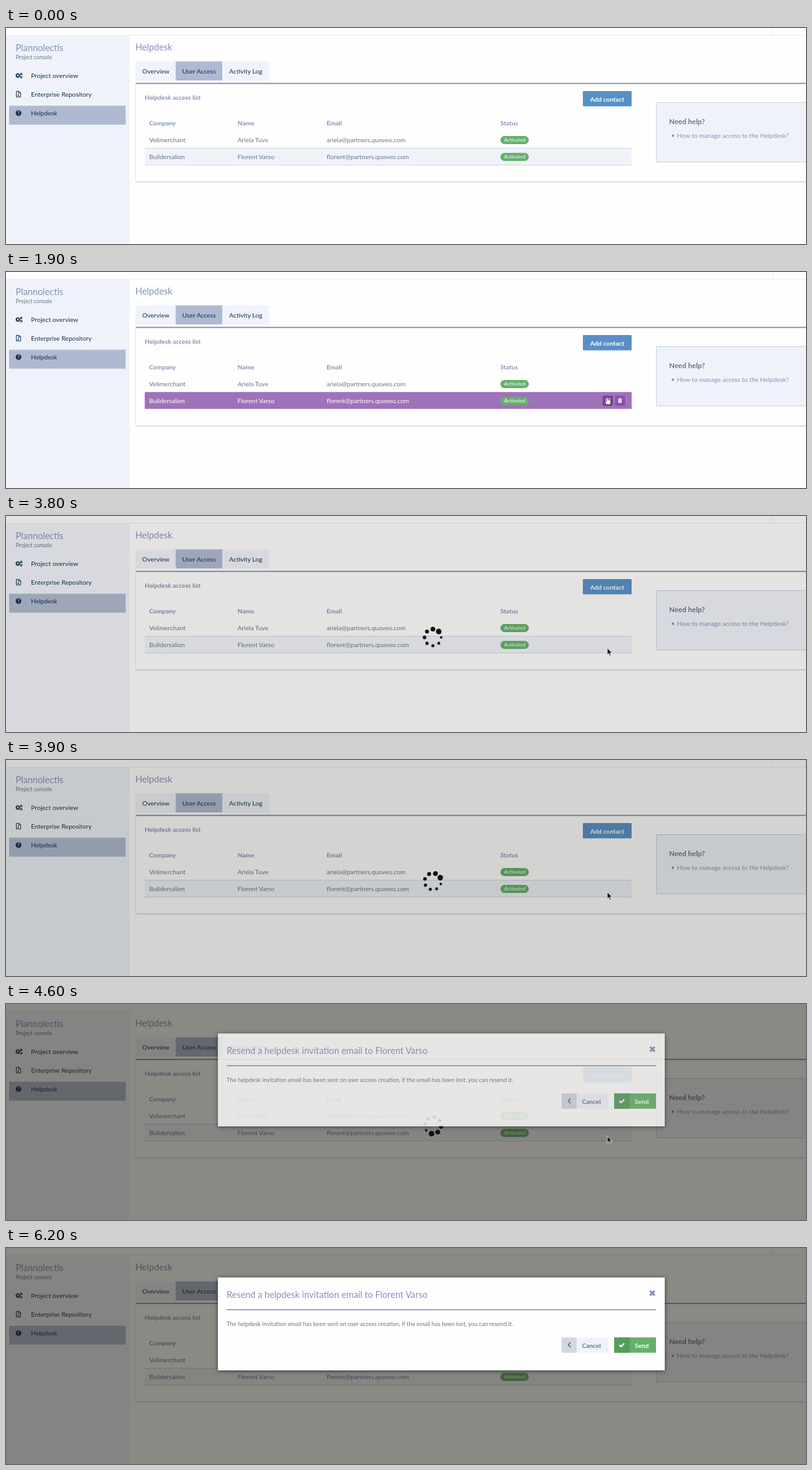
Animation of 1280 by 346 pixels, one loop 6400 ms. Source, as an HTML page:

```html
<!DOCTYPE html>
<html lang="en">
<head>
<meta charset="utf-8">
<title>Helpdesk access</title>
<style>
  html, body { margin: 0; width: 100%; height: 100%; overflow: hidden; background: #fefefe; }
  svg { display: block; width: 1280px; height: 346px; font: 10.15px Lato, sans-serif; }
  .nav { fill: #11324d; font-size: 10.25px; }
  .title { fill: #8292bb; font-size: 14.4px; }
  .small { font-size: 8.64px; }
  .head { fill: #8292bb; font-weight: 700; }
  .cell { fill: #67768a; }
  .btn { font-weight: 700; }
  .white { fill: #fff; }
  .tip { fill: #fff; font: 10.25px "Open Sans", "Noto Sans", sans-serif; }
  .line { fill: none; stroke-linejoin: round; }
</style>
</head>
<body>
<svg viewBox="0 0 1280 346">
  <defs>
    <filter id="soft" x="-5%" y="-20%" width="110%" height="140%">
      <feDropShadow dx="0" dy="1" stdDeviation="3.5" flood-opacity=".6"/>
    </filter>
    <filter id="lift" x="-2%" y="-5%" width="104%" height="112%">
      <feDropShadow dx="0" dy="1" stdDeviation="1.2" flood-color="#5a6680" flood-opacity=".45"/>
    </filter>
    <g id="badge">
      <rect x="791" y="-6.5" width="45.5" height="13" rx="6.5" fill="#65b16c"/>
      <text x="797" y="2.6" class="white" style="font-size:8.1px">Activated</text>
    </g>
  </defs>

  <rect width="1280" height="346" fill="#fefefe"/>
  <path d="M0 11.5H1280M1226.5 0V11" stroke="#e9ebf0"/>

  <!-- sidebar -->
  <rect y="12" width="198" height="334" fill="#eff3f9"/>
  <rect x="5" y="124.5" width="186.500" height="30.300" fill="#afb9d1"/>
  <text x="15.500" y="37.300" class="title">Plannolectis</text>
  <text x="15.500" y="50" class="cell small">Project console</text>
  <g class="nav">
    <text x="40" y="80">Project overview</text>
    <text x="40" y="110">Enterprise Repository</text>
    <text x="40" y="140">Helpdesk</text>
  </g>
  <g class="line" stroke="#11324d">
    <circle cx="19" cy="76.200" r="2.200" stroke-width="1.700"/>
    <circle cx="19" cy="76.200" r="3.400" stroke-width="1.100" stroke-dasharray="1.400 1.270"/>
    <circle cx="24.400" cy="73.600" r="1.300" stroke-width="1.200"/>
    <circle cx="24.400" cy="78.800" r="1.300" stroke-width="1.200"/>
    <path d="M16.500 101.500h4.500l2.500 2.500v6.500h-7zM21 101.500v2.700h2.500"/>
    <path d="M19.500 102.500v4" stroke-dasharray="1 .7"/>
    <circle cx="19.600" cy="107.800" r="1"/>
  </g>
  <circle cx="20" cy="136.300" r="4.500" fill="#11324d"/>
  <text x="20" y="139" text-anchor="middle" fill="#afb9d1" style="font-size:7.500px;font-weight:900">?</text>

  <!-- main panel -->
  <text x="207" y="36" class="title">Helpdesk</text>
  <rect x="207" y="53.500" width="214" height="30.500" rx="2" fill="#f0f3f9"/>
  <rect x="271.500" y="53.500" width="74.500" height="30.500" fill="#afb9d1"/>
  <g class="nav">
    <text x="218" y="73">Overview</text>
    <text x="282" y="73">User Access</text>
    <text x="357" y="73">Activity Log</text>
  </g>
  <rect x="208" y="89" width="1090" height="156.500" fill="#fefefe" filter="url(#lift)"/>
  <rect x="207.500" y="87.800" width="1073" height="1.900" fill="#8592b5"/>
  <text x="222" y="114.700" class="head">Helpdesk access list</text>
  <rect x="923" y="101" width="78" height="24.500" rx="1" fill="#5890c6"/>
  <text x="962" y="118.200" text-anchor="middle" class="btn white">Add contact</text>
  <g class="head">
    <text x="229" y="156.300">Company</text>
    <text x="370.500" y="156.300">Name</text>
    <text x="513" y="156.300">Email</text>
    <text x="791" y="156.300">Status</text>
  </g>
  <g class="cell">
    <text x="229" y="183">Velimerchant</text>
    <text x="370.500" y="183">Ariela Tuve</text>
    <text x="513" y="183">ariela@partners.quoveo.com</text>
  </g>
  <use href="#badge" y="179.500"/>
  <g id="plain">
    <rect x="222" y="192" width="779" height="28" fill="#eff3f9"/>
    <path d="M222 192.500H1001M222 219.500H1001" stroke="#cfd6e2"/>
  </g>
  <g id="hover">
    <rect x="222" y="192.300" width="779" height="27" fill="#a072b9"/>
    <rect id="mail" x="954.500" y="198" width="16.500" height="16.500" rx="2" fill="#8a52aa"/>
    <rect x="974.500" y="198" width="16" height="16.500" rx="2" fill="#8a52aa"/>
    <rect x="959.800" y="203.300" width="6.200" height="5.400" rx="1" class="line" stroke="#fff" stroke-width="1.500"/>
    <path d="M979 203.700h6.500M981 202.800h2.500" stroke="#fff"/>
    <path d="M979.600 204.700h5.300v4.800h-5.300z" class="white"/>
    <path d="M981.300 205.300v3.400M983.200 205.300v3.400" stroke="#8a52aa" stroke-width=".6"/>
  </g>
  <g class="cell" id="row">
    <text x="229" y="210">Buildersalion</text>
    <text x="370.500" y="210">Florent Varso</text>
    <text x="513" y="210">florent@partners.quoveo.com</text>
  </g>
  <use href="#badge" y="206.500"/>
  <rect x="1040.500" y="119.500" width="260" height="95" fill="#eff3f9" stroke="#c6d0e4"/>
  <text x="1061" y="154" class="cell btn" style="font-size:11.500px">Need help?</text>
  <circle cx="1067" cy="172.500" r="2" fill="#8292bb"/>
  <text x="1073.500" y="175.700" fill="#8292bb">How to manage access to the Helpdesk?</text>

  <rect id="shade" width="1280" height="346" fill="#1a170c"/>
  <g id="spinner" fill="#121212"></g>

  <!-- dialog -->
  <g id="dialog">
    <rect x="339" y="47.300" width="715" height="148.700" fill="#fefefe" filter="url(#soft)"/>
    <text x="353" y="79.500" class="title">Resend a helpdesk invitation email to Florent Varso</text>
    <path d="M1030.500 68.700l7.400 7.400m0-7.400l-7.400 7.400" stroke="#8292bb" stroke-width="3.200"/>
    <rect x="353" y="98" width="687" height="1.500" fill="#7f8cb3"/>
    <text x="353" y="125.200" class="cell" style="font-size:9.360px">The helpdesk invitation email has been sent on user access creation, if the email has been lost, you can resend it.</text>
    <rect x="889" y="143.300" width="75" height="24.400" fill="#eff3f9"/>
    <rect x="889" y="143.300" width="24" height="24.400" fill="#d2d6de"/>
    <path d="M903.300 151.300l-3.700 3.900 3.700 3.900" class="line" stroke="#67768a" stroke-width="1.900"/>
    <text x="921.500" y="160" class="cell btn">Cancel</text>
    <rect x="973" y="143.300" width="67" height="24.400" rx="1" fill="#65b16c"/>
    <rect x="973" y="143.300" width="25" height="24.400" rx="1" fill="#559c5f"/>
    <rect id="press" x="973" y="143.300" width="67" height="24.400" rx="1" fill="#2c7a3c"/>
    <path d="M981.500 155.300l2.700 2.700 5-5.300" fill="none" stroke="#fff" stroke-width="2.100"/>
    <text x="1006" y="160" class="btn white">Send</text>
  </g>

  <g id="tip">
    <rect x="962.500" y="228" width="263" height="30.500" rx="3" fill="#2f2f2f"/>
    <text x="972" y="247" class="tip">Resend a helpdesk invitation email to Florent Varso</text>
  </g>

  <g id="cursor">
    <path id="arrow" d="M0 0V11l2.500-2.300 1.800 4 1.900-.9-1.800-3.800H8z" fill="#161616" stroke="#fff" stroke-width=".8"/>
    <path id="hand" d="M-1.200 .8Q0-.8 1.200 .8V4.500L5 5.300Q6.200 5.700 6 7.500L5 12.500H-1.200L-4.300 8Q-4.300 6.300-2.800 6.900L-1.200 8z" fill="#fff" stroke="#222" stroke-width=".9" stroke-linejoin="round"/>
  </g>
</svg>
<script>
const LOOP = 6400, STEP = 100;
const $ = id => document.getElementById(id);

// Rows are [time, value, ...], linear in between
const shadeKeys = [[3700, 0.055], [3800, 0.115], [4300, 0.46], [4400, 0.5]];
const dialogKeys = [[4300, 0], [4400, 0.2], [4600, 0.8], [4700, 0.95], [4800, 1]];
const pressKeys = [[5100, 0], [5300, 0.4], [5600, 0.4], [5800, 0]];
const path = [
  [800, 921, 320], [900, 936, 288], [1000, 936, 288], [1100, 938, 283],
  [1300, 946, 255], [1500, 956, 219], [1700, 962, 202], [1800, 962, 200],
  [2000, 962, 200], [2100, 962, 201], [2200, 962, 201], [2500, 962, 210.5],
  [3700, 962, 210.5], [3800, 962, 211.5], [4600, 962, 211.5], [4800, 976, 195],
  [5000, 997, 164], [5100, 1000, 159], [5500, 1000, 159], [5600, 970, 150],
  [5700, 850, 126], [5800, 620, 90], [5900, 360, 52], [6000, 130, 19], [6100, 13, 2]
];

function at(keys, t) {
  const i = keys.findIndex(k => k[0] > t);
  if (i < 0) return keys[keys.length - 1].slice(1);
  if (i === 0) return keys[0].slice(1);
  const a = keys[i - 1], b = keys[i], p = (t - a[0]) / (b[0] - a[0]);
  return a.slice(1).map((v, n) => v + (b[n + 1] - v) * p);
}

const show = (id, on) => $(id).setAttribute("visibility", on ? "visible" : "hidden");
const fade = (id, v) => $(id).setAttribute("opacity", v);
const between = (t, a, b) => t >= a && t < b;

// Dots run clockwise from the right, the largest one leads
$("spinner").innerHTML = [2, 2.4, 2.5, 2.6, 2.9, 3.2, 3.8, 4.5].map((r, i) => {
  const a = i * Math.PI / 4;
  return `<circle cx="${13.3 * Math.cos(a)}" cy="${13.3 * Math.sin(a)}" r="${r}"/>`;
}).join("");

function draw(t) {
  const [x, y] = at(path, t);
  const hovered = between(t, 1500, 3800);
  const onMail = between(t, 1600, 3800);
  const hand = onMail || between(t, 5000, 5600);

  show("hover", hovered);
  show("plain", !hovered);
  $("row").style.fill = hovered ? "#fff" : "";
  $("mail").setAttribute("fill", onMail ? "#7f3fa2" : "#8a52aa");
  show("tip", between(t, 3200, 3800));

  fade("shade", t < 3800 ? 0 : at(shadeKeys, t)[0]);
  fade("dialog", at(dialogKeys, t)[0]);
  fade("press", at(pressKeys, t)[0]);

  show("spinner", between(t, 3800, 4700));
  $("spinner").setAttribute("transform", `translate(683 194.500) rotate(${(t - 3800) * 0.18})`);

  const visible = between(t, 800, 6200);
  show("arrow", visible && !hand);
  show("hand", visible && hand);
  $("cursor").setAttribute("transform", `translate(${x} ${y})`);
}

const start = performance.now();
function tick() {
  const t = (performance.now() - start) % LOOP;
  draw(Math.floor(t / STEP) * STEP);
  requestAnimationFrame(tick);
}
tick();
</script>
</body>
</html>
```
